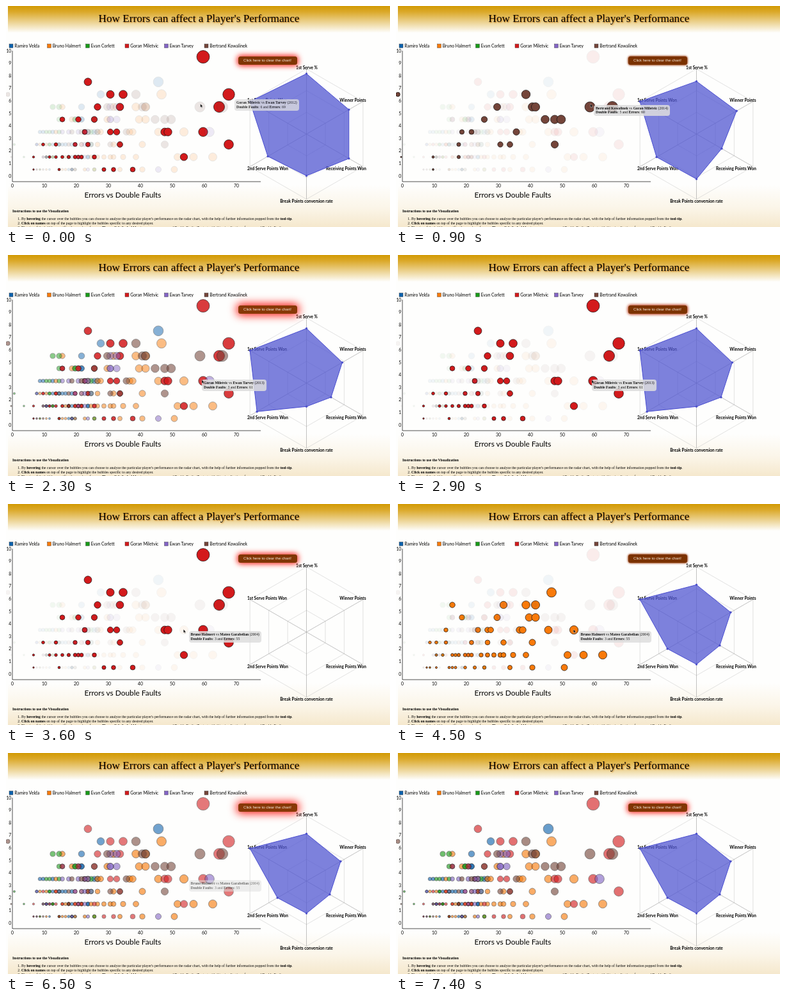
Recreate the animation shown at these times as an HTML page. Size 600 by 346 pixels, loop 7.5 s.

```html
<!DOCTYPE html>
<html lang="en">
<head>
<meta charset="utf-8">
<title>How Errors can affect a Player's Performance</title>
<style>
html, body { margin: 0; width: 100%; height: 100%; overflow: hidden; background: #fefefd; }
#stage { position: relative; width: 600px; height: 346px; overflow: hidden; }
#stage > * { position: absolute; }
#head { left: 3px; right: 0; top: 0; height: 42px; background: linear-gradient(#d29a04, #dba92a 22%, #fefefd); }
#foot { left: 3px; right: 0; top: 280px; height: 66px; background: linear-gradient(#fefefd, #fbf5e8 55%, #f5e8cd); }
svg { left: 0; top: 0; }
text { white-space: pre; }
.serif { font-family: "Liberation Serif", "Times New Roman", serif; font-size: 5.76px; }
.lato { font-family: Lato, sans-serif; font-size: 6.8px; }
.title { font-size: 17.2px; text-shadow: 1px 1px 2px #c87400; }
.axis { font-size: 11.9px; }
.spoke { font-size: 6.5px; font-weight: bold; }
#btn { left: 362.5px; top: 78.5px; width: 92px; height: 13.5px; border-radius: 3.5px;
  font: 6.02px/13.5px "Liberation Sans", Arial, sans-serif; color: #fbeee4; text-align: center; white-space: nowrap; }
#tip { box-sizing: border-box; height: 17.5px; padding: 2.2px 3px 0; border-radius: 4px;
  background: rgba(222, 222, 222, .86); color: #111; line-height: 6.7px; white-space: nowrap; }
</style>
</head>
<body>
<div id="stage">
  <div id="head"></div>
  <div id="foot"></div>
  <svg id="chart" width="600" height="346" viewBox="0 0 600 346"></svg>
  <div id="btn">Click here to clear the chart!</div>
  <div id="tip" class="serif"></div>
  <svg width="600" height="346" viewBox="0 0 600 346">
    <path id="mouse" d="M0 0V5.4L1.3 4.3 2.2 6.2 3.1 5.8 2.2 3.9H3.9Z" fill="#000" stroke="#fff" stroke-width=".35"/>
  </svg>
</div>
<script>
const LOOP = 7500;
const $ = id => document.getElementById(id);
const chart = $('chart');

function add(tag, attrs, parent = chart) {
  const el = document.createElementNS('http://www.w3.org/2000/svg', tag);
  for (const k in attrs) el.setAttribute(k, attrs[k]);
  parent.appendChild(el);
  return el;
}
function label(x, y, str, cls, anchor = 'start') {
  const el = add('text', { x, y, class: cls, 'text-anchor': anchor });
  el.innerHTML = str.replace(/\*(.+?)\*/g, '<tspan font-weight="bold">$1</tspan>');
}

// Errors per player, keyed by number of double faults
const players = [
  { name: 'Ramiro Velda', color: '#0e62ad', x: 5, rows: { 7: [47], 6: [29], 5: [23], 4: [17, 23], 3: [10] } },
  { name: 'Bruno Halmert', color: '#f97a0a', x: 64.5, rows: {
    6: [48], 5: [17, 33, 40, 43], 4: [20, 31, 41, 43],
    3: [15, 25, 28, 29, 38, 39, 47, 55], 2: [10, 12, 15, 23, 28, 33, 42],
    1: [12, 14, 17, 18, 19, 21, 22, 23, 26, 28, 30, 32, 33, 36, 40, 53, 58, 64],
    0: [9, 10, 12, 16, 17, 18, 21, 24, 27, 35, 42, 52] } },
  { name: 'Evan Corlett', color: '#189a18', x: 124.5, rows: { 5: [14, 16], 4: [16, 21], 2: [2], 1: [5] } },
  { name: 'Goran Miletvic', color: '#d31a1c', x: 186, rows: {
    9: [61], 7: [25], 6: [32, 36, 69], 5: [28, 35, 66], 4: [17, 22, 27],
    3: [24, 32, 34, 49, 50, 61], 2: [11, 15, 21, 25, 35, 69],
    1: [8, 13, 15, 17, 19, 21, 22, 23, 27, 55], 0: [8, 16, 30, 33, 39] } },
  { name: 'Ewan Tarvey', color: '#8264c4', x: 247.5, rows: { 5: [32, 34], 4: [32], 3: [63], 0: [47] } },
  { name: 'Bertrand Kowalinek', color: '#74453a', x: 310, rows: {
    6: [0, 40], 5: [31, 42, 43, 60, 67], 4: [27, 46, 49, 51], 3: [20, 23, 37],
    2: [19, 32, 35, 49], 1: [1, 11, 19], 0: [11] } }
];
const [VELDA, HALMERT, CORLETT, MILETVIC, TARVEY, KOWALINEK] = players;

// Dense low-error region for the three players that are never highlighted
let seed = 4711;
const rnd = () => (seed = seed * 16807 % 2147483647) / 2147483647;
[[8, 20, 13], [8, 20, 17], [8, 24, 17], [10, 18, 15], [21, 14, 5]].forEach(([min, span, n], v) => {
  for (let i = 0; i < n; i++) {
    const p = [VELDA, TARVEY, CORLETT][i % 3];
    (p.rows[v] = p.rows[v] || []).push(min + Math.round(span * rnd() ** 1.3));
  }
});

// Static page
label(301.5, 25, "How Errors can affect a Player's Performance", 'serif title', 'middle');
for (const p of players) {
  add('rect', { x: p.x, y: 59.5, width: 6, height: 6, fill: p.color, stroke: '#333', 'stroke-width': .4 });
  label(p.x + 8.3, 65.3, p.name, 'lato');
}
add('path', { d: 'M10 70V275H398', fill: 'none', stroke: '#222', 'stroke-width': .8 });
for (let v = 0; v <= 10; v++) label(8.3, 268.5 - 19.6 * v, '' + v, 'lato', 'end');
for (let e = 0; e <= 70; e += 10) label(10 + 5 * e, 284, '' + e, 'lato', 'middle');
label(182.5, 299.7, 'Errors vs Double Faults', 'lato axis', 'middle');
label(10, 322.5, '*Instructions to use the Visualization*', 'serif');
[
  "By *hovering* the cursor over the bubbles you can choose to analyze the particular player's performance on the radar chart, with the help of further information popped from the *tool-tip*.",
  '*Click on names* on top of the page to highlight the bubbles specific to any desired player.',
  'The size of the bubbles specifies the number of errors. *Please click the bubbles to compare* errors and Double Faults. To start with this visualization of errors and Double Faults.'
].forEach((s, i) => label(18.3, 335 + 6.8 * i, `${i + 1}. ${s}`, 'serif'));

// Bubbles
for (const p of players) {
  p.dots = [];
  for (const v in p.rows) for (const e of p.rows[v]) {
    p.dots.push(add('circle', {
      cx: 3 + 5 * e, cy: 256 - 19.6 * v, r: .5 + .086 * e + .47 * v,
      fill: p.color, stroke: '#111', 'stroke-width': .7
    }));
  }
}

// Radar, clockwise from the top
const spoke = (i, f) => {
  const a = i * Math.PI / 3;
  return [469.5 + 102 * f * Math.sin(a), 200.5 - 102 * f * Math.cos(a)];
};
const ring = fs => fs.map((f, i) => spoke(i, f).join()).join(' ');
for (let k = 1; k <= 3; k++)
  add('polygon', { points: ring(Array(6).fill(k / 3)), fill: 'none', stroke: '#c4c4c4', 'stroke-width': .5 });
for (let i = 0; i < 6; i++) {
  const [x2, y2] = spoke(i, 1);
  add('line', { x1: 469.5, y1: 200.5, x2, y2, stroke: '#999', 'stroke-width': .6 });
}
[
  [470, 98.7, '1st Serve %'], [542, 149.7, 'Winner Points'], [531.5, 256.7, 'Receiving Points Won'],
  [469.5, 308.2, 'Break Points conversion rate'], [409, 256.7, '2nd Serve Points Won'], [408, 149.7, '1st Serve Points Won']
].forEach(([x, y, s]) => label(x, y, s, 'lato spoke', 'middle'));
const radar = add('g', {});
const area = add('polygon', { fill: '#5257d2', 'fill-opacity': .75, stroke: '#4a4ed0', 'stroke-width': 1 }, radar);
const knobs = [0, 1, 2, 3, 4, 5].map(() => add('circle', { r: 1.7, fill: '#4d51cc' }, radar));

const shapes = [
  [0, [.926, .75, .75, .64, .684, 1]],
  [100, null],
  [900, [.81, .71, .446, .69, .706, 1]],
  [2050, [.838, .633, .435, .36, .876, 1]],
  [3300, null],
  [3900, [.725, .605, .412, .495, .514, 1]]
];
const tipText = (a, b, year, faults, errors) =>
  `<b>${a.name || a}</b> vs <b>${b.name || b}</b> (${year})<br><b>Double Faults</b>: ${faults} and <b>Errors</b>: ${errors}`;
const tips = [
  [0, 357, 146, tipText(MILETVIC, TARVEY, 2012, 6, 69)],
  [100, 309, 154.5, tipText(KOWALINEK, MILETVIC, 2014, 5, 60)],
  [1950, 306, 195, tipText(MILETVIC, TARVEY, 2013, 3, 61)],
  [3300, 285.5, 199, tipText(HALMERT, 'Mateo Garabelian', 2004, 3, 55)]
];

// Keyframes as [time, value]
const calm = [[0, .13], [200, .05], [1400, .05], [1900, .6], [2200, .6], [2300, .5], [2500, .05], [6100, .05], [6400, .58], [7400, .62]];
const fades = new Map(players.map(p => [p, calm]));
fades.set(MILETVIC, [[0, 1], [800, 1], [900, .07], [1400, .07], [1900, .6], [2100, .6], [2300, .85], [2500, 1],
  [3700, 1], [3900, .08], [6100, .06], [6400, .58], [7400, .62]]);
fades.set(KOWALINEK, [[0, .13], [200, .05], [800, .05], [900, 1], [1400, 1], [1900, .62], [2200, .62], [2300, .57],
  [2500, .05], [6100, .05], [6400, .58], [7400, .62]]);
fades.set(HALMERT, [...calm.slice(0, 7), [3700, .05], [3900, 1], [6100, 1], [6400, .62]]);
const glow = [[0, .5], [200, .3], [800, .3], [900, .08], [1400, .05], [1500, .3], [1600, .3], [2200, 1], [2400, 1], [3000, .05],
  [3600, .5], [3900, .9], [4500, .08], [5100, 1], [5700, .08], [6400, 1], [6600, 1], [7100, .1], [7400, .5]];
const tipFade = [[0, .9], [100, .6], [200, 1], [1700, 1], [1850, 0], [1950, 0], [2100, 1], [3200, 1], [3300, .4], [3450, 1],
  [6300, 1], [6500, .6], [6750, 0]];
const mouseX = [[1700, 303.7], [2000, 306], [3200, 306], [3350, 277.3]];
const mouseY = [[1700, 153.3], [2000, 195.5], [3200, 195.5], [3350, 196.3]];

function at(keys, t) {
  const i = keys.findIndex(k => k[0] > t);
  if (i === 0) return keys[0][1];
  if (i < 0) return keys[keys.length - 1][1];
  const [t0, a] = keys[i - 1], [t1, b] = keys[i];
  return a + (b - a) * (t - t0) / (t1 - t0);
}
const current = (list, t) => list.filter(k => k[0] <= t).pop();
const mix = (a, b, f) => `rgb(${a.map((v, i) => Math.round(v + (b[i] - v) * f)).join()})`;

let shownTip;
function draw(t) {
  for (const p of players) {
    const o = at(fades.get(p), t);
    for (const dot of p.dots) dot.setAttribute('opacity', o);
  }

  const shape = current(shapes, t)[1];
  radar.setAttribute('visibility', shape ? 'visible' : 'hidden');
  if (shape) {
    area.setAttribute('points', ring(shape));
    knobs.forEach((k, i) => {
      const [x, y] = spoke(i, shape[i]);
      k.setAttribute('cx', x);
      k.setAttribute('cy', y);
    });
  }

  const tip = current(tips, t), box = $('tip');
  if (tip !== shownTip) {
    shownTip = tip;
    box.style.left = tip[1] + 'px';
    box.style.top = tip[2] + 'px';
    box.innerHTML = tip[3];
  }
  box.style.opacity = at(tipFade, t);

  const g = at(glow, t), btn = $('btn').style;
  btn.background = mix([122, 50, 0], [136, 56, 6], g);
  btn.boxShadow = `0 0 ${2 + 12 * g}px ${.5 + 2 * g}px ${mix([127, 51, 0], [255, 24, 16], Math.min(1, g * 2))}`;

  $('mouse').setAttribute('transform', `translate(${at(mouseX, t)} ${at(mouseY, t)})`);
  $('mouse').setAttribute('visibility', t < 6100 ? 'visible' : 'hidden');
}

const start = performance.now();
function tick() {
  draw((performance.now() - start) % LOOP);
  requestAnimationFrame(tick);
}
tick();
</script>
</body>
</html>
```
